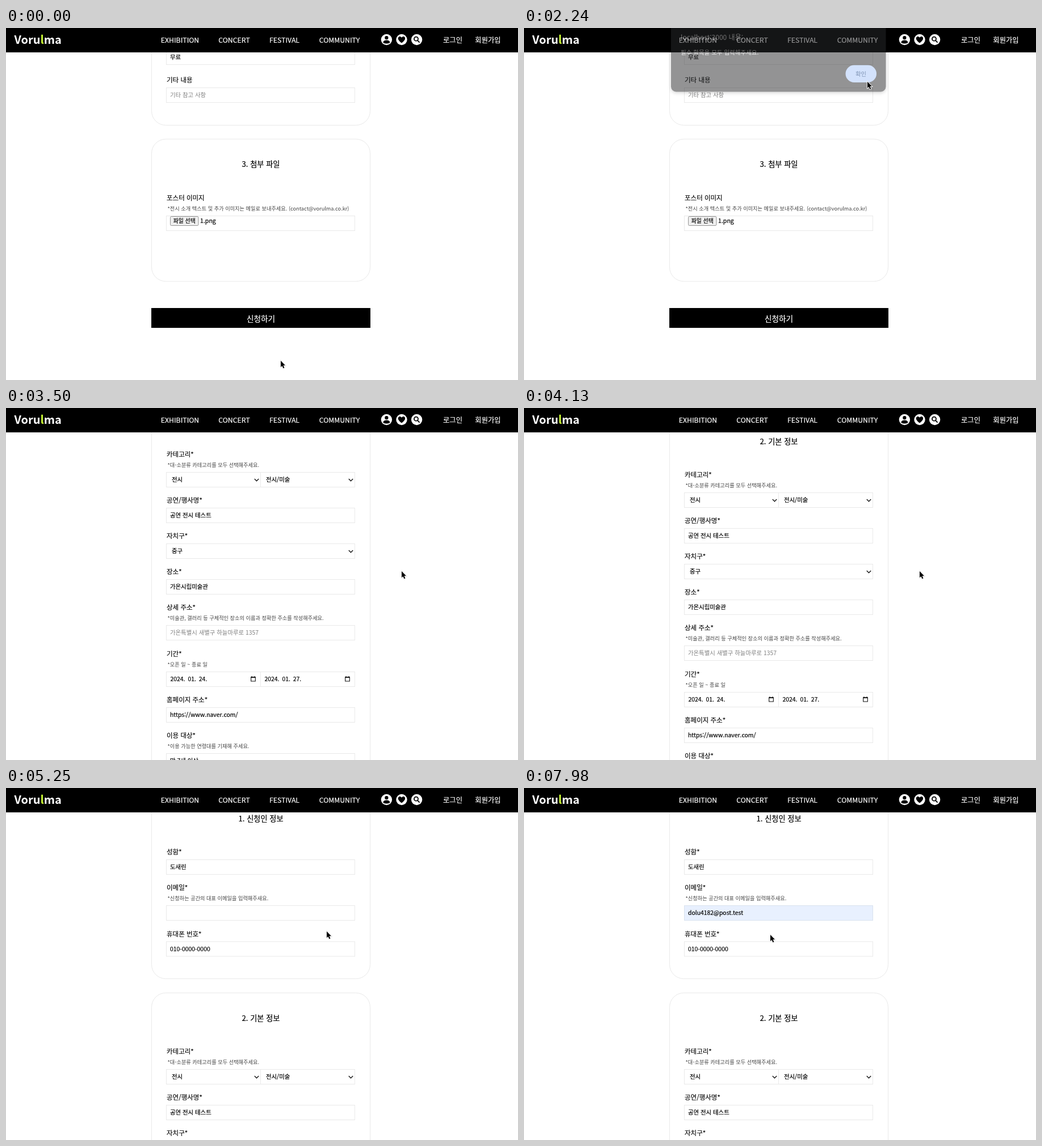
Animation of 902 by 621 pixels, one loop 8 s. Source, as an HTML page:

```html
<!DOCTYPE html>
<html lang="ko">
<head>
<meta charset="utf-8">
<title>Vorulma</title>
<style>
  html, body { margin: 0; width: 100%; height: 100%; overflow: hidden; background: #fff; }
  svg { display: block; width: 100vw; height: 100vh; cursor: default; }
  text { font-family: "Noto Sans CJK KR", "Noto Sans CJK", "Noto Sans", sans-serif; white-space: pre; }
  .medium { font-weight: 500; stroke: currentColor; stroke-width: .2px; }
  .system { font-family: Inter, "Noto Sans CJK KR", sans-serif; }
  .date { word-spacing: 2px; }
  .line { fill: #fff; stroke: #e9e9e9; }
  .mid { text-anchor: middle; }
</style>
</head>
<body>
<svg id="stage" viewBox="0 0 902 621" xmlns="http://www.w3.org/2000/svg">
  <g id="page"></g>
  <g id="header"><rect width="902" height="43"/></g>
  <g id="popup">
    <path d="M376 242l8-7.5 8 7.5z" fill="#1f1f1f"/>
    <rect x="366" y="241" width="152.5" height="189.5" rx="3" fill="#1f1f1f" style="filter:drop-shadow(0 1px 2px #0006)"/>
    <rect id="hover" x="366" y="241.5" width="152.5" height="33.5" rx="2" fill="#353535"/>
  </g>
  <g id="dialog">
    <rect x="259" y="-40" width="378.5" height="152.5" rx="9" fill="#292a2c" style="filter:drop-shadow(0 2px 3px #0005)"/>
    <rect x="566.5" y="65.5" width="54.5" height="30.5" rx="15.2" fill="#a8c7fa"/>
  </g>
  <circle id="ring" r="18" fill="none" stroke="#000" stroke-width="1.5" style="filter:drop-shadow(0 0 .6px #fff)"/>
  <g id="cursor" style="filter:drop-shadow(0 .6px .6px #0005)">
    <path id="arrow" d="M0 0v11.3l2.5-2.3 1.9 4.3 2-.9-1.9-4.1h3.5z" stroke="#fff" stroke-width="1.8" paint-order="stroke"/>
    <path id="beam" d="M-3-8q3 0 3 2v12q0 2-3 2M3-8q-3 0-3 2v12q0 2 3 2" fill="none" stroke="#000" stroke-width="1.2"/>
  </g>
</svg>
<script>
(() => {
const $ = id => document.getElementById(id);
const LOOP = 8000, STEP = 70;

function add(parent, tag, attrs) {
  const node = document.createElementNS('http://www.w3.org/2000/svg', tag);
  for (const key in attrs) node.setAttribute(key, attrs[key]);
  return parent.appendChild(node);
}

// y is the visual middle of the line
function label(parent, x, y, str, size, fill = '#000', cls = '') {
  const node = add(parent, 'text', { x, y: y + size * .37, 'font-size': size, fill, class: cls });
  node.style.color = fill;
  node.textContent = str;
  return node;
}

const page = $('page');
const card = (top, bottom, title) => {
  add(page, 'rect', { x: 256.5, y: top, width: 385, height: bottom - top, rx: 25, class: 'line' });
  label(page, 449, top + 44.5, title, 13.2, '#000', 'medium mid');
};
const box = (y, x = 282.5, width = 332) =>
  add(page, 'rect', { x, y, width, height: 26, class: 'line' });
const value = (y, str, x = 289) => label(page, x, y + 13, str, 10.4, '#000', 'medium');
const hint = (y, str) => label(page, 289, y + 13, str, 10.4, '#808080');
const chevron = (x, y) =>
  add(page, 'path', { d: `M${x - 3.7} ${y - 2}l3.7 3.8 3.7-3.8`, fill: 'none', stroke: '#111', 'stroke-width': 1.3 });

// returns the top of the input below the caption
function caption(y, title, note) {
  label(page, 283, y, title, 11.5, '#111', 'medium');
  if (note) label(page, 284.5, y + 19, note, 9.2, '#444');
  return y + (note ? 31.5 : 13.5);
}
function field(y, title, note, str) {
  const top = caption(y, title, note);
  box(top);
  value(top, str);
}
function halves(top, draw) {
  [282.5, 448.5].forEach((x, i) => { box(top, x, 166); draw(x, i); });
}
function calendar(x, y) {
  add(page, 'path', { d: `M${x - 3.8} ${y - 3.2}h7.6v7.2h-7.6z`, fill: 'none', stroke: '#111', 'stroke-width': 1.1 });
  add(page, 'path', { d: `M${x - 4.2} ${y - 2.7}h8.4M${x - 2.5} ${y - 4.8}v2M${x + 2.5} ${y - 4.8}v2`, stroke: '#111', 'stroke-width': 1.3 });
}

// applicant
card(9.5, 336.5, '1. 신청인 정보');
field(113, '성함*', '', '도새린');
caption(176, '이메일*', '*신청하는 공간의 대표 이메일을 입력해주새요.');
const emailBox = box(207.5);
const email = value(207.5, 'dolu4182@post.test');
const emailPreview = label(page, 289, 221, 'dolu4182@post.test', 10.2, '#111', 'system');
field(257.5, '휴대폰 번호*', '', '010-0000-0000');

// basic details
card(361.5, 1187.5, '2. 기본 정보');
let slot = caption(465, '카테고리*', '*대-소분류 카테고리를 모두 선택해주세요.');
halves(slot, (x, i) => {
  value(slot, ['전시', '전시/미술'][i], x + 9.5);
  chevron(x + 159, slot + 13.5);
});
field(546, '공연/행사명*', '', '공연 전시 테스트');
slot = caption(609, '자치구*');
box(slot);
value(slot, '중구', 292);
chevron(607.5, slot + 13.5);
field(672, '장소*', '', '가온시립미술관');
slot = caption(735, '상세 주소*', '*미술관, 갤러리 등 구체적인 장소의 이름과 정확한 주소를 작성해주세요.');
box(slot);
hint(slot, '가온특별시 새별구 하늘마루로 1357');
slot = caption(817, '기간*', '*오픈 일 ~ 종료 일');
halves(slot, (x, i) => {
  value(slot, ['2024. 01. 24.', '2024. 01. 27.'][i], x + 7).classList.add('date');
  calendar(x + 153, slot + 12.5);
});
field(898, '홈페이지 주소*', '', 'https://www.naver.com/');
field(961, '이용 대상*', '*이용 가능한 연령대를 기재해 주세요.', '만 7세 이상');
field(1041, '이용 요금*', '', '무료');
slot = caption(1108, '기타 내용');
box(slot);
hint(slot, '기타 참고 사항');

// attachments
card(1212, 1463, '3. 첨부 파일');
slot = caption(1316, '포스터 이미지', '*전시 소개 텍스트 및 추가 이미지는 메일로 보내주세요. (contact@vorulma.co.kr)');
box(slot);
add(page, 'rect', { x: 289.5, y: 1348.5, width: 49.5, height: 16, rx: 2, fill: '#efefef', stroke: '#8a8a8a', 'stroke-width': .9 });
label(page, 314.2, 1356, '파일 선택', 9.9, '#000', 'medium mid');
label(page, 342, 1356, '1.png', 10.6, '#000', 'medium');
add(page, 'rect', { x: 256, y: 1510, width: 386, height: 35 });
label(page, 449, 1528.5, '신청하기', 13.6, '#fff', 'medium mid');

// header
const header = $('header');
const brand = label(header, 14.5, 21, '', 20, '#fff');
brand.setAttribute('font-weight', 700);
[['Voru', '#fff'], ['l', '#c6f432'], ['ma', '#fff']].forEach(([str, fill]) => {
  add(brand, 'tspan', { fill }).textContent = str;
});
[['EXHIBITION', 306.5], ['CONCERT', 402], ['FESTIVAL', 490.5], ['COMMUNITY', 587.5], ['로그인', 787], ['회원가입', 849]]
  .forEach(([str, x]) => label(header, x, 21, str, 12.3, '#fff', 'medium mid'));
for (const cx of [670.4, 697, 723.6]) add(header, 'circle', { cx, cy: 20.5, r: 9.7, fill: '#fff' });
add(header, 'circle', { cx: 670.4, cy: 17.2, r: 3.1 });
add(header, 'path', { d: 'M664.4 26q0-4.6 6-4.6t6 4.6q-6 3-12 0z' });
add(header, 'path', { d: 'M697 26.4c-9-6-6.4-11.4-3.2-11.4 1.8 0 2.7 1 3.2 2.2 .5-1.2 1.4-2.2 3.2-2.2 3.2 0 5.800 5.400-3.200 11.400z' });
add(header, 'path', { d: 'M725.2 22.2l3.4 3.4M726 19.2a3.5 3.5 0 1 1-7 0 3.5 3.5 0 1 1 7 0z', fill: 'none', stroke: '#000', 'stroke-width': 1.8 });

// autofill list and alert
['dolu4182@post.test', 'bami382@mail.test', 'visitor@inbox1.test', 'demo@box.test', 'nara507@post.test', 'ori842@post.test']
  .forEach((str, i) => label($('popup'), 376.5, 260 + i * 30.4, str, 11.4, '#e6e6e6', 'system'));
const dialog = $('dialog');
label(dialog, 276, 17, 'localhost:3000 내용:', 12, '#e3e3e3');
label(dialog, 276, 43.5, '필수 항목을 모두 입력해주세요.', 10.5, '#dedede');
label(dialog, 593.5, 81, '확인', 10.4, '#062e6f', 'mid');

// motion: [time, ...values]
const pointerKeys = [
  [0, 484, 587], [280, 495, 508], [980, 495, 508], [1120, 489, 510], [1190, 489, 510], [1260, 488, 511],
  [1400, 488, 511], [1890, 596, 84], [2170, 596, 84], [2590, 717, 229], [2940, 717, 229], [3150, 697, 288],
  [5040, 697, 288], [5460, 433, 218], [6090, 433, 218], [6300, 432, 256], [6440, 433, 258],
  [7000, 433, 258], [7140, 434, 259]
];
const scrollKeys = [[3220, 1016], [3500, 383], [3990, 383], [4480, 199], [4550, 199], [4830, 0]];
const alertKeys = [[1330, -45, 0], [1400, -27, .92], [1540, 0, 1], [2170, 0, 1], [2310, 0, 0]];
const clicks = [[420, 630], [1960, 2170], [2660, 2870], [5950, 6160], [6370, 6510], [6790, 6930]];

const ease = p => p * p * (3 - 2 * p);
const linear = p => p;
function at(keys, t, curve = ease) {
  const next = keys.findIndex(key => key[0] > t);
  if (next < 0) return keys[keys.length - 1].slice(1);
  if (next === 0) return keys[0].slice(1);
  const a = keys[next - 1], b = keys[next];
  const p = curve((t - a[0]) / (b[0] - a[0]));
  return a.slice(1).map((v, i) => v + (b[i + 1] - v) * p);
}
const during = (t, from, to) => t >= from && t < to;
const show = (node, on) => { node.style.display = on ? '' : 'none'; };

function render(time) {
  const t = Math.floor(time / STEP) * STEP;
  const [x, y] = at(pointerKeys, t);
  $('cursor').setAttribute('transform', `translate(${x} ${y})`);
  $('ring').setAttribute('transform', `translate(${x - .3} ${y - .3})`);
  show($('ring'), clicks.some(([from, to]) => during(t, from, to)));
  const inField = during(t, 5390, 6160);
  show($('arrow'), !inField);
  show($('beam'), inField);

  page.setAttribute('transform', `translate(0 ${-Math.round(at(scrollKeys, t)[0])})`);

  const [dy, opacity] = at(alertKeys, t, linear);
  dialog.setAttribute('transform', `translate(0 ${dy})`);
  dialog.setAttribute('opacity', opacity);

  const focused = during(t, 5950, 6790), preview = during(t, 6230, 6440), filled = t >= 6440;
  emailBox.style.fill = preview || filled ? '#e8f0fe' : '#fff';
  emailBox.style.stroke = focused ? '#1c5ba6' : filled ? '#d9e2ee' : '';
  emailBox.style.strokeWidth = focused ? 1.8 : 1;
  emailBox.setAttribute('rx', focused ? 2 : 0);
  show(email, filled);
  show(emailPreview, preview);
  show($('popup'), during(t, 6020, 6440));
  show($('hover'), preview);
}

const start = performance.now();
(function tick() {
  render((performance.now() - start) % LOOP);
  requestAnimationFrame(tick);
})();
})();
</script>
</body>
</html>
```
